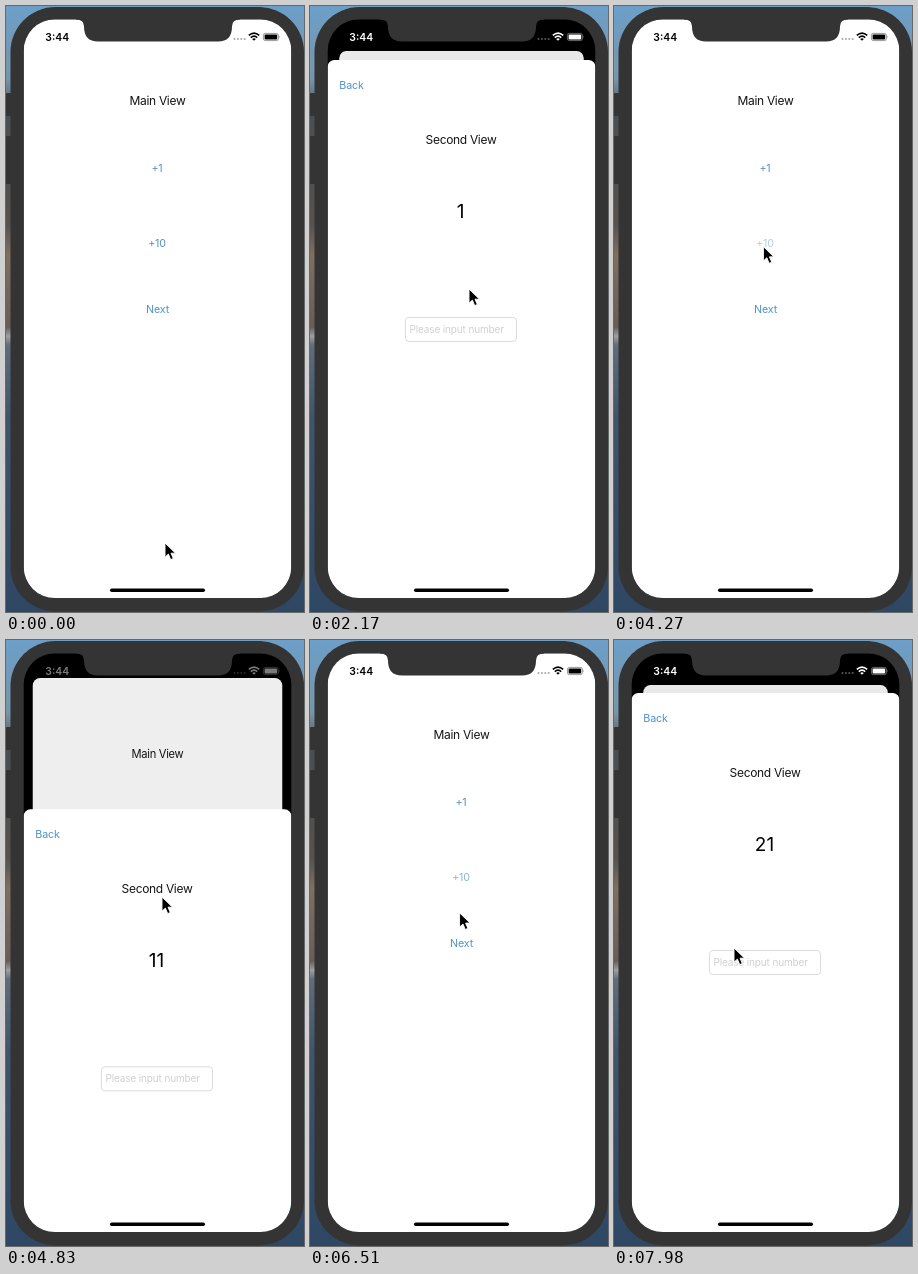
Animation of 298 by 606 pixels, one loop 8 s. Source, as an HTML page:

```html
<!DOCTYPE html>
<html lang="en">
<head>
<meta charset="utf-8">
<title>Sheet demo</title>
<style>
  html, body { margin: 0; width: 100%; height: 100%; overflow: hidden; background: #2d4865; }
  svg { display: block; width: 298px; height: 606px; }
  text { font-family: Inter, "Open Sans", sans-serif; text-anchor: middle; }
  .title { font-size: 12px; letter-spacing: -.32px; fill: #151515; }
  .button { font-size: 10.7px; letter-spacing: -.15px; fill: #5190c6; }
  .number { font-size: 19px; fill: #000; }
  .hint { font-size: 10px; letter-spacing: -.14px; fill: #d0d0d2; text-anchor: start; }
  .clock { font-size: 10.4px; font-weight: 600; text-anchor: start; }
</style>
</head>
<body>
<svg viewBox="0 0 298 606">
  <defs>
    <linearGradient id="wall" x2="0" y2="1">
      <stop offset="0" stop-color="#6c9fc9"/>
      <stop offset=".12" stop-color="#7895a8"/>
      <stop offset=".18" stop-color="#4b4e51"/>
      <stop offset=".36" stop-color="#55524f"/>
      <stop offset=".41" stop-color="#7f6f61"/>
      <stop offset=".53" stop-color="#6a5d55"/>
      <stop offset=".545" stop-color="#9c9fa1"/>
      <stop offset=".56" stop-color="#5f6d7a"/>
      <stop offset=".68" stop-color="#42546a"/>
      <stop offset="1" stop-color="#2e4763"/>
    </linearGradient>
    <clipPath id="screen"><rect x="17.7" y="13.5" width="267.6" height="578.5" rx="31"/></clipPath>
  </defs>

  <rect width="298" height="606" fill="url(#wall)"/>
  <g fill="#343434">
    <rect y="87" width="9" height="23" rx="1"/>
    <rect y="130" width="9" height="48" rx="1"/>
    <rect x="4.5" y="1" width="293.5" height="604.5" rx="45"/>
  </g>

  <g clip-path="url(#screen)">
    <rect x="17" y="13" width="269" height="580"/>
    <g id="main">
      <rect id="card" x="17.5" y="13" width="268" height="580" fill="#fff"/>
      <text class="title" x="151.5" y="99">Main View</text>
      <text class="button" id="one" x="151" y="166">+1</text>
      <text class="button" id="ten" x="151" y="240.5">+10</text>
      <text class="button" id="next" x="151.5" y="307">Next</text>
      <rect id="dim" x="17.5" y="13" width="268" height="580" rx="8"/>
    </g>
    <g id="sheet">
      <rect x="17.5" width="268" height="600" rx="7" fill="#fff"/>
      <text class="button" id="back" x="41.5" y="29">Back</text>
      <text class="title" x="151" y="84">Second View</text>
      <text class="number" id="number" x="150.5" y="158"></text>
      <rect x="95.5" y="257.5" width="111" height="24" rx="3.5" fill="#fff" stroke="#dcdcdc"/>
      <text class="hint" x="99.5" y="273">Please input number</text>
    </g>
    <rect x="104" y="582.6" width="95" height="3.5" rx="1.75"/>
  </g>

  <path fill="#343434" d="M70 12.5h164v1q-8 0-8 7q0 15-14 15H92q-14 0-14-15q0-7-8-7z"/>
  <g id="status">
    <text class="clock" x="39.3" y="34.7">3:44</text>
    <g opacity=".35">
      <circle cx="228.5" cy="33" r="1"/><circle cx="231.9" cy="33" r="1"/>
      <circle cx="235.3" cy="33" r="1"/><circle cx="238.7" cy="33" r="1"/>
    </g>
    <g fill="none" stroke="currentColor" stroke-width="1.6">
      <path d="M242.8 29.4q5.2-4.6 10.4 0"/>
      <path d="M244.8 31.6q3.2-2.8 6.4 0"/>
    </g>
    <path d="M246.2 33q1.8-1.4 3.6 0l-1.8 1.8z"/>
    <rect x="257.4" y="27.4" width="15" height="7.2" rx="2" fill="none" stroke="currentColor" stroke-width=".8" opacity=".5"/>
    <rect x="258.6" y="28.6" width="12.6" height="4.8" rx="1"/>
    <path d="M273.4 29.8q1.2 1.2 0 2.4z" opacity=".5"/>
  </g>

  <path id="cursor" d="M0 0V14.2L3.4 11.1L5.7 16.6L8.3 15.5L6 10.2H10.5Z" stroke="#fff" stroke-width=".9" stroke-linejoin="round"/>
</svg>
<script>
const LOOP = 8000, STEP = 70;
const OPEN_DELAY = 124, OPEN_TIME = 500, CLOSE_DELAY = 150, CLOSE_TIME = 340;
const SHEET_TOP = 53, SCREEN_TOP = 13, SCREEN_END = 592, CENTER = 151.5;

// Where the pointer passes and what it taps there.
const cues = [
  { t: 0, at: [159, 537] },
  { t: 1080, at: [153, 160], tap: 'one' },
  { t: 1640, at: [153, 301], tap: 'next' },
  { t: 2170, at: [159, 283] },
  { t: 2730, at: [154, 308] },
  { t: 3430, at: [43, 78], tap: 'back' },
  { t: 4100, at: [149, 235], tap: 'ten' },
  { t: 4540, at: [154, 300], tap: 'next' },
  { t: 4830, at: [156, 257] },
  { t: 5770, at: [46, 84], tap: 'back' },
  { t: 6280, at: [149, 235], tap: 'ten' },
  { t: 6682, at: [150, 301], tap: 'next' },
  { t: 7070, at: [144, 232] },
  { t: 7900, at: [120, 308] }
];
const amount = { one: 1, ten: 10 };

const el = Object.fromEntries([...document.querySelectorAll('[id]')].map(n => [n.id, n]));
const clamp = v => Math.max(0, Math.min(1, v));
const mix = (a, b, p) => a + (b - a) * p;
const smooth = p => p * p * (3 - 2 * p);
const settle = p => 1 - (1 - p) ** 3.8;
const lastTap = (name, t) => cues.findLast(c => c.tap === name && c.t <= t)?.t ?? -LOOP;

// The pointer rests shortly before and after each tap.
function pointer(t) {
  const i = cues.findLastIndex(c => c.t <= t);
  const from = cues[i], to = cues[i + 1] || from;
  const leave = from.t + (from.tap ? 130 : 0);
  const arrive = to.t - (to.tap ? 90 : 0);
  const p = smooth(clamp((t - leave) / Math.max(1, arrive - leave)));
  return from.at.map((v, k) => mix(v, to.at[k], p));
}

function draw(t) {
  const show = lastTap('next', t - OPEN_DELAY) + OPEN_DELAY;
  const hide = lastTap('back', t - CLOSE_DELAY) + CLOSE_DELAY;
  const rise = clamp((t - show) / OPEN_TIME);
  const fall = hide > show ? clamp((t - hide) / CLOSE_TIME) : 0;
  const shown = show > 0 ? 1 : 0;
  const open = shown * settle(rise) * (1 - settle(fall));
  const light = shown * clamp(rise * 1.45) * (1 - clamp(fall * 1.45));

  el.sheet.setAttribute('transform', `translate(0 ${mix(SCREEN_END, SHEET_TOP, open)})`);
  el.main.setAttribute('transform',
    `translate(${CENTER} ${mix(SCREEN_TOP, 45, open)}) scale(${mix(1, .912, open)}) translate(${-CENTER} ${-SCREEN_TOP})`);
  el.card.setAttribute('rx', open > 0 ? 8 : 0);
  el.dim.setAttribute('opacity', .085 * open);
  el.number.textContent = cues.reduce((n, c) => n + (c.t < show ? amount[c.tap] || 0 : 0), 0);

  const c = Math.round(255 * light);
  el.status.style.color = el.status.style.fill = `rgb(${c},${c},${c})`;
  for (const name of ['one', 'ten', 'next', 'back']) {
    const fade = clamp((t - lastTap(name, t) - 110) / 200);
    el[name].setAttribute('opacity', mix(.2, 1, fade));
  }
  el.cursor.setAttribute('transform', `translate(${pointer(t)})`);
}

const origin = performance.now();
function tick() {
  const now = (performance.now() - origin) % LOOP;
  draw(Math.floor(now / STEP) * STEP);
  requestAnimationFrame(tick);
}
tick();
</script>
</body>
</html>
```
